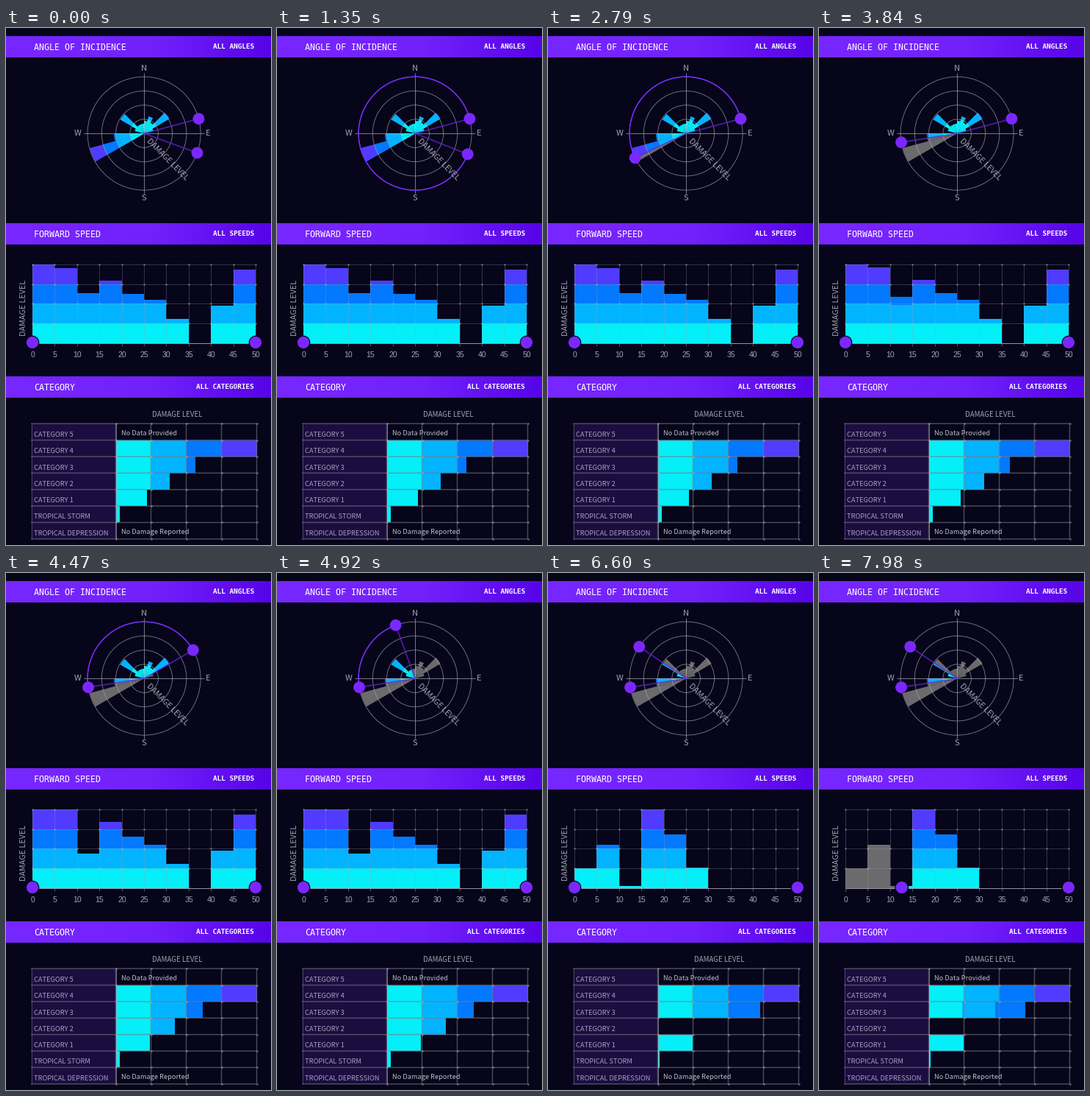
A matplotlib script for the animation above (8 s loop, 361 by 702 pixels).

```python
import numpy as np
import matplotlib.pyplot as plt
from matplotlib.animation import FuncAnimation
from matplotlib.collections import LineCollection, PolyCollection
from matplotlib.colors import LinearSegmentedColormap
from matplotlib.patches import Circle

W, H, DPI = 361, 702, 64
LOOP, STEP = 8000, 32
PT = 72 / DPI

BG, GREY, ACCENT = "#06051a", "#6b6a6c", "#7a28ff"
BANDS = ["#04eff8", "#02b4ff", "#0279ff", "#4f3cff"]
SANS = ["Noto Sans CJK JP", "DejaVu Sans"]
MONO = ["DejaVu Sans Mono"]

CX, CY, R = 188.1, 143.2, 77            # rose
BX, BY, BW, BH = 36, 427, 30.4, 26.5    # speed columns
TX, TY, TW, TH = 149.5, 537.2, 48, 22.37  # category rows


def stages(base, *changes):
    """Bar lengths in grid units before and after each filter."""
    out = [np.array(base, float)]
    for change in changes:
        nxt = out[-1].copy()
        nxt[list(change)] = list(change.values())
        out.append(nxt)
    return np.array(out)


SPEED = stages([4, 3.8, 2.53, 3.17, 2.5, 2.2, 1.2, 0, 1.88, 3.74],
               {1: 4, 2: 1.75, 3: 3.36, 4: 2.6},
               {0: 1, 1: 2.2, 2: .07, 3: 4, 4: 2.72, 5: 1.03, 6: 0, 8: 0, 9: 0},
               {})
CATEGORY = stages([0, 4, 2.26, 1.54, .88, .12, 0],
                  {2: 2.46, 3: 1.67, 4: .96},
                  {2: 2.9, 3: 0, 4: .98, 5: .06},
                  {2: 0})

# 15 degree sectors by start angle: small lobes around north, four long arms
SECTORS = {a: 13 + 11 * np.exp(-((a - 60) / 15) ** 2) for a in range(15, 165, 15)}
SECTORS.update({30: 40, 135: 37.5, 180: 41, 195: 76.5})

fig = plt.figure(figsize=(W / DPI, H / DPI), dpi=DPI, facecolor=BG)
ax = fig.add_axes([0, 0, 1, 1])


def label(x, y, s, px, color="#a3a2ac", font=SANS, **kw):
    ax.text(x, y, s, fontsize=px * PT, color=color, family=font, zorder=6, **kw)


def lines(segs, color, alpha, width=1, z=3, **kw):
    ax.add_collection(LineCollection(segs, colors=color, alpha=alpha,
                                     linewidths=width * PT, zorder=z, **kw))


def grid(xs, ys, color, alpha, dot_alpha, **kw):
    lines([[(x, ys[0]), (x, ys[-1])] for x in xs], color, alpha, **kw)
    lines([[(xs[0], y), (xs[-1], y)] for y in ys], color, alpha, **kw)
    gx, gy = np.meshgrid(xs, ys)
    ax.plot(gx.ravel(), gy.ravel(), "o", ms=2.6 * PT, mew=0, color="#b9b9c6",
            alpha=dot_alpha, zorder=3)


def header(top, title, value):
    cmap = LinearSegmentedColormap.from_list(
        "bar", [(0, "#7727ff"), (.55, "#7321fb"), (1, "#5604e8")])
    ax.imshow(np.linspace(0, 1, W)[None], cmap=cmap, aspect="auto",
              extent=(0, W, top + 29, top), zorder=1)
    label(38, top + 19, title, 11.63, "white", MONO)
    label(338, top + 17, value, 9.4, "white", MONO, ha="right", weight="bold")


def draw_rose_axes():
    for k in range(1, 5):
        ax.add_patch(Circle((CX, CY), R * k / 4, fill=False, ec="#a5a5ae",
                            alpha=.7, lw=.9 * PT, zorder=3))
    lines([[(CX, 61), (CX, 225)], [(106, CY), (270, CY)]], "#b5b5bd", .65)
    for s, x, y in [("N", 188, 58), ("E", 275.5, 146.5), ("S", 188, 234.5),
                    ("W", 97.5, 146.5)]:
        label(x, y, s, 11.2, ha="center")
    label(219.5, 178.5, "DAMAGE LEVEL", 10.6, rotation=-45, ha="center",
          va="center", rotation_mode="anchor")


def draw_speed_axes():
    xs = BX + BW * np.arange(11)
    grid(xs, BY - BH * np.arange(1, 5), "#9a9aae", .3, .45)
    lines([[(x, BY - BH), (x, BY)] for x in xs], "#9a9aae", .3)
    lines([[(x, BY), (x, BY + 5)] for x in xs], "#c4c4cc", .4)
    lines([[(xs[0], BY + .5), (xs[-1], BY + .5)]], "#c4c4cc", .75, z=1.5)
    for i, x in enumerate(xs):
        label(x + .3, 447, str(5 * i), 10.5, font=["Liberation Sans"], ha="center")
    label(24.5, 380, "DAMAGE LEVEL", 10.7, rotation=90, ha="center", va="center")


def draw_category_axes():
    xs = TX + TW * np.arange(5)
    ys = TY + TH * np.arange(8)
    ax.fill([34, TX, TX, 34], [ys[0], ys[0], ys[-1], ys[-1]],
            color="#1c0d40", lw=0, zorder=1)
    style = dict(width=1.5, snap=False)
    grid(xs, ys, "#77767f", .6, .5, **style)
    lines([[(34, y), (TX, y)] for y in ys], "#77767f", .6, **style)
    lines([[(34.5, ys[0]), (34.5, ys[-1])]], "#77767f", .5)
    lines([[(TX, ys[0]), (TX, ys[-1])]], "#b5b5bd", .6)
    names = ["CATEGORY %d" % n for n in range(5, 0, -1)]
    names += ["TROPICAL STORM", "TROPICAL DEPRESSION"]
    for i, name in enumerate(names):
        label(38, 555 + 22.3 * i, name, 9.3, "#a79fbd")
    label(233, 528, "DAMAGE LEVEL", 9.7, ha="center")
    label(157, 553, "No Data Provided", 9.3, "#bcbbc4")
    label(157, 687.3, "No Damage Reported", 9.3, "#bcbbc4")


header(11, "ANGLE OF INCIDENCE", "ALL ANGLES")
header(265, "FORWARD SPEED", "ALL SPEEDS")
header(473, "CATEGORY", "ALL CATEGORIES")
draw_rose_axes()
draw_speed_axes()
draw_category_axes()

shapes = ax.add_collection(PolyCollection([], lw=0, zorder=2))
arc, = ax.plot([], [], color=ACCENT, lw=1.5 * PT, zorder=4)
spokes = [ax.plot([], [], color="#6a25d8", alpha=.7, lw=1.8 * PT, zorder=4)[0]
          for _ in range(2)]
knobs = [ax.add_patch(Circle((0, 0), 7.9, color=ACCENT, lw=0, zorder=5))
         for _ in range(2)]
low, high = [ax.add_patch(Circle((x, BY), 8.7, fc=ACCENT, ec=BG, lw=1.2 * PT, zorder=7))
             for x in (BX, BX + 10 * BW)]
ax.set(xlim=(0, W), ylim=(H, 0), aspect="auto")
ax.axis("off")


def ease(t, start, end):
    u = np.clip((t - start) / (end - start), 0, 1)
    return .5 - .5 * np.cos(np.pi * u)


def polar(deg, r):
    a = np.radians(deg)
    return CX + r * np.cos(a), CY - r * np.sin(a)


def wedge(a0, a1, r):
    x, y = polar(np.linspace(a0, a1, 8), r)
    return [(CX, CY), *zip(x, y)]


def rect(x0, y0, x1, y1):
    return [(x0, y0), (x1, y0), (x1, y1), (x0, y1)]


def rose(a, b):
    for start, r in SECTORS.items():
        end = start + 15
        lo, hi = np.clip([a, b], start, end)
        for g0, g1 in ((start, lo), (hi, end)):
            if g1 > g0:
                yield wedge(g0, g1, r), GREY
        if hi > lo:
            for k in (3, 2, 1, 0):
                if r > k * R / 4:
                    yield wedge(lo, hi, min(r, (k + 1) * R / 4)), BANDS[k]


def stacked(table, p):
    """For each bar, the eased ends of its bands, longest first."""
    i = min(int(p), len(table) - 2)
    for v0, v1 in zip(table[i], table[i + 1]):
        ends = [min(v0, k) + (min(v1, k) - min(v0, k)) * (p - i)
                for k in (4, 3, 2, 1)]
        yield [(e, c) for e, c in zip(ends, BANDS[::-1]) if e > 0]


def columns(p, cut):
    for i, bands in enumerate(stacked(SPEED, p)):
        x0, x1 = BX + i * BW, BX + (i + 1) * BW
        mid = np.clip(cut, x0, x1)
        for end, color in bands:
            top = BY - end * BH
            if mid > x0:
                yield rect(x0, BY + 1, mid, top), GREY
            if mid < x1:
                yield rect(mid, BY + 1, x1, top), color


def rows(p):
    for i, bands in enumerate(stacked(CATEGORY, p)):
        y = TY + i * TH
        for end, color in bands:
            yield rect(TX, y, TX + end * TW, y + TH), color


def update(n):
    t = (n + .5) * STEP
    b = np.interp(t, [1350, 1830, 2160, 2790, 3120, 3420],
                  [340, 270, 238, 205.6, 203, 189])
    a = np.interp(t, [4380, 4920, 5220, 5400], [15, 111.5, 135, 146])
    cut = BX + 76.7 * ease(t, 7170, 7560)
    p = ease(t, 3600, 4350) + ease(t, 5640, 6600) + ease(t, 7800, 9000)

    parts = [*rose(a, b), *columns(p, cut), *rows(p)]
    shapes.set_verts([v for v, _ in parts])
    shapes.set_facecolor([c for _, c in parts])

    for deg, spoke, knob in zip((a, b), spokes, knobs):
        x, y = polar(deg, R)
        spoke.set_data([CX, x], [CY, y])
        knob.center = x, y
    arc.set_data(*polar(np.linspace(a, b, 90), R))
    arc.set_visible(1350 < t < 3420 or 4260 < t < 5640)
    low.center = cut, BY
    return shapes, arc, *spokes, *knobs, low


anim = FuncAnimation(fig, update, frames=LOOP // STEP, interval=STEP,
                     init_func=lambda: update(0), repeat=True, repeat_delay=0)
plt.show()
```
